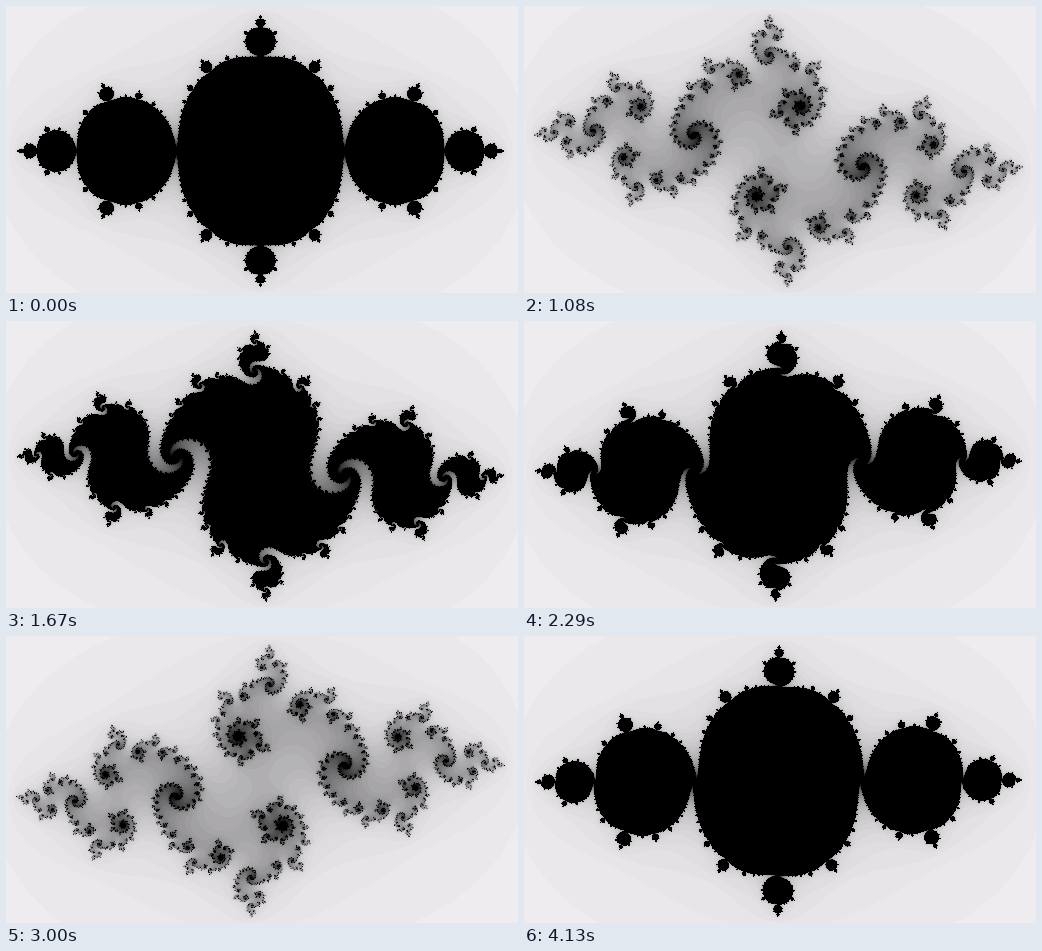
An HTML page with a canvas for the animation above (4.18 s loop, 512x287 px).

```html
<!DOCTYPE html>
<html lang="en">
<head>
<meta charset="utf-8">
<title>Julia set</title>
<style>
html, body { margin: 0; width: 100%; height: 100%; overflow: hidden; background: #efedf0; }
canvas { display: block; width: 512px; height: 287px; }
</style>
</head>
<body>
<canvas id="stage" width="512" height="287"></canvas>
<script>
const W = 512, H = 287;
const LOOP = 4180, STEPS = 100, FPS = 24;
const SCALE = 160, CX = 254, CY = 144.5;
const LIMIT = 50;
const ctx = document.getElementById('stage').getContext('2d');
const cache = [];

// Packed ABGR greys with a faint violet tint, darker for slower escape.
const shades = new Uint32Array(LIMIT + 1);
for (let n = 0; n < LIMIT; n++) {
  const v = 242 * (1 - (n / LIMIT) ** 1.15);
  const r = Math.round(v * 0.995), g = Math.round(v * 0.985), b = Math.round(v);
  shades[n] = (255 << 24 | b << 16 | g << 8 | r) >>> 0;
}
shades[LIMIT] = 0xff000000;

function escapeTime(x, y, cr, ci) {
  let n = 0, xx = x * x, yy = y * y;
  while (n < LIMIT && xx + yy <= 4) {
    y = 2 * x * y + ci;
    x = xx - yy + cr;
    xx = x * x;
    yy = y * y;
    n++;
  }
  return n;
}

function render(step) {
  const ci = 0.2 * Math.sin(2 * Math.PI * step / STEPS);
  const image = new ImageData(W, H);
  const px = new Uint32Array(image.data.buffer);
  for (let j = 0, k = 0; j < H; j++) {
    const y = (CY - j) / SCALE;
    for (let i = 0; i < W; i++, k++) {
      px[k] = shades[escapeTime((i - CX) / SCALE, y, -0.8, ci)];
    }
  }
  return image;
}

// Steps start on 24 fps ticks rounded to hundredths of a second.
const startOf = step => Math.round(step * 100 / FPS) * 10;

function stepAt(ms) {
  let step = Math.min(STEPS - 1, Math.floor(ms * FPS / 1000) + 1);
  while (startOf(step) > ms) step--;
  return step;
}

let shown = -1;
function draw(now) {
  const step = stepAt(Math.max(0, now - t0) % LOOP);
  if (step !== shown) {
    cache[step] = cache[step] || render(step);
    ctx.putImageData(cache[step], 0, 0);
    shown = step;
  }
  requestAnimationFrame(draw);
}

const t0 = performance.now();
draw(t0);
</script>
</body>
</html>
```
